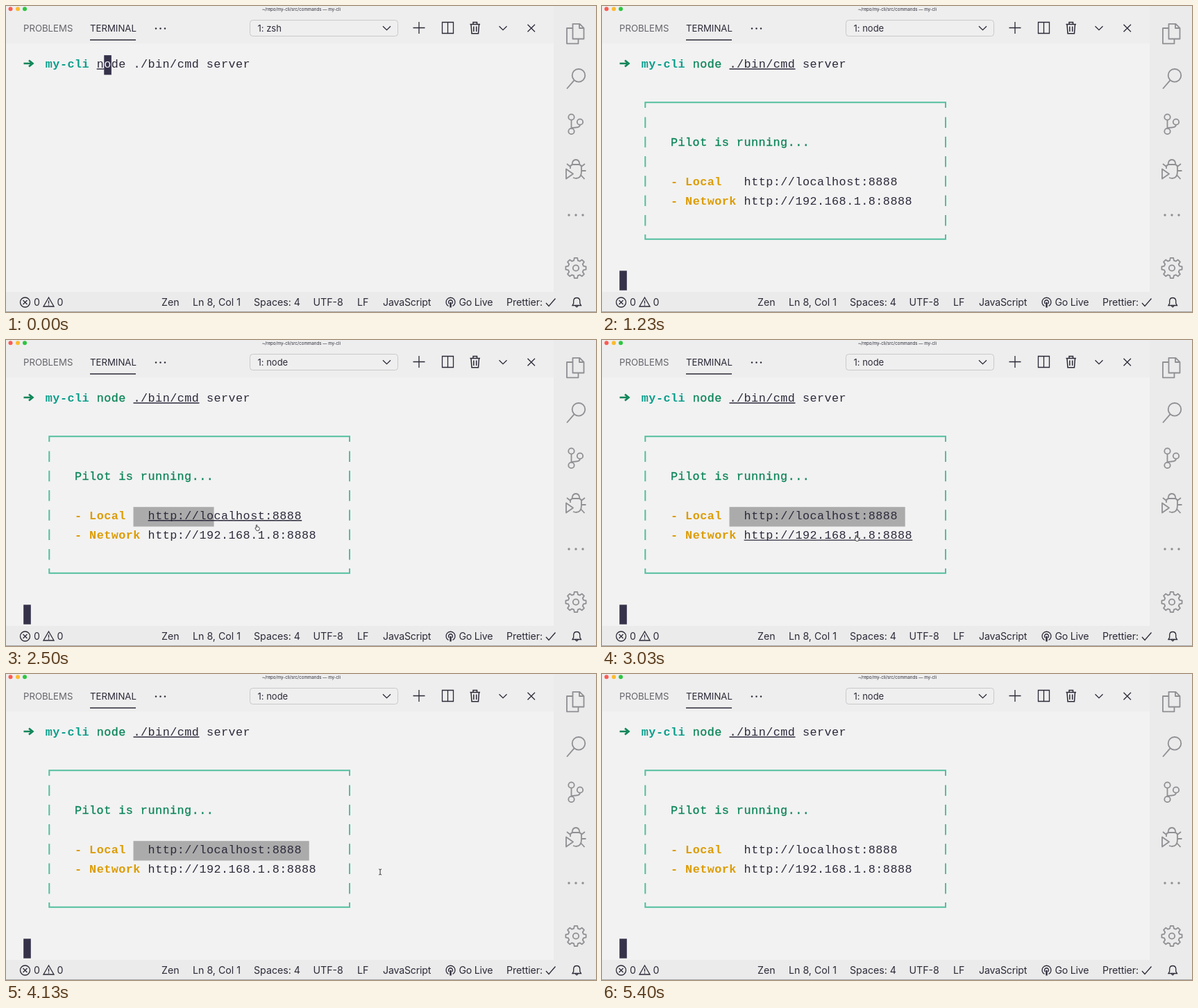
Recreate the animation shown at these times as an HTML page. Size 850 px wide and 442 px high, loop 5430 ms.

```html
<!DOCTYPE html>
<html lang="en">
<head>
<meta charset="utf-8">
<title>Terminal</title>
<style>
  html, body { margin: 0; width: 100%; height: 100%; overflow: hidden; background: #f2f2f2; }
  svg { display: block; width: 850px; height: 442px; }
  .ui { font: 14.2px Inter, Roboto, sans-serif; fill: #2b2a38; }
  .tab { font-size: 13.2px; }
  .pick { font-size: 13px; }
  .mono { font: 16.8px "Liberation Mono", "DejaVu Sans Mono", monospace; letter-spacing: .47px; fill: #2c2a3b; }
  .b { font-weight: 700; }
  .teal { fill: #0c9f8c; }
  .green { fill: #0b8558; stroke: #0b8558; stroke-width: .3; }
  .gold { fill: #dc9c05; }
  .line { fill: none; stroke: #2b2a38; stroke-width: 1.3; }
  .side { fill: none; stroke: #8f8f94; stroke-width: 1.8; }
  .under { stroke: #2c2a3b; stroke-width: 1.4; }
  .frame { fill: none; stroke: #52bf9f; stroke-width: 2; }
</style>
</head>
<body>
<svg viewBox="0 0 850 442">
  <rect width="850" height="442" fill="#ebebeb"/>
  <rect width="789" height="54" fill="#eeeeee"/>
  <rect y="54" width="789" height="359" fill="#f2f2f2"/>
  <rect y="441" width="850" height="1" fill="#a5a5a5"/>

  <!-- title bar -->
  <circle cx="6.5" cy="4.2" r="3" fill="#fc5b53"/>
  <circle cx="17" cy="4.2" r="3" fill="#fcbb2f"/>
  <circle cx="27" cy="4.2" r="3" fill="#2bc63f"/>
  <text class="ui" x="425.5" y="6.8" text-anchor="middle" style="font-size:6.2px">~/repo/my-cli/src/commands — my-cli</text>

  <!-- panel header -->
  <text class="ui tab" x="25" y="37" style="fill:#66656c">PROBLEMS</text>
  <text class="ui tab" x="121" y="37">TERMINAL</text>
  <path class="line" d="M121 49H187"/>
  <g fill="#2b2a38">
    <circle cx="216" cy="32.5" r="1.2"/><circle cx="222.5" cy="32.5" r="1.2"/><circle cx="229" cy="32.5" r="1.2"/>
  </g>
  <rect x="351.5" y="20.5" width="213" height="23" rx="4" fill="#efefef" stroke="#c9c9cc"/>
  <text id="shell" class="ui pick" x="362.5" y="37">1: zsh</text>
  <g class="line">
    <path d="M543 29.2l5.5 5.5 5.5-5.5"/>
    <path d="M586.5 31.5H603.5M595 23V40"/>
    <path d="M628.5 23.5H644.5V39.5H628.5ZM636.5 23.5V39.5"/>
    <path stroke-width="1.5" d="M668.5 26.5H683M673 26.5V23.5H678.5V26.5M670 26.5L671 39.7H680.5L681.500 26.5M673.8 29.5V37M677.7 29.5V37"/>
    <path d="M710.5 29.2l5.5 5.5 5.5-5.5"/>
    <path d="M751.5 26.7L762 37.2M762 26.7L751.5 37.2"/>
  </g>

  <!-- activity bar -->
  <g class="side" stroke-linejoin="round">
    <path d="M816.5 25.8H826.5L832.5 31.8V47.5H816.5ZM826 25.8V32H832.5M816.5 32H808V54.3H824.5V47.5"/>
    <circle cx="825" cy="100.3" r="9.3"/><path d="M818.5 107.3L808 119.5"/>
    <circle cx="814.5" cy="160.5" r="4.2"/><circle cx="827" cy="167.500" r="4.2"/><circle cx="814.5" cy="181" r="4.2"/>
    <path d="M814.5 164.7V176.8M827 171.7Q826.5 175.500 821 175.5T814.5 177"/>
    <path d="M813 235V232Q814 229 817 229H825Q828 229 829 232V239Q829 249 821 249L817 248M815.5 229Q816 222 821 222T826.5 229M829 238H835.5M829 232L834 228M813 232L808 228M828 244L833.5 250M807 235.5V249.5L817 242.5Z"/>
    <path id="gear"/><circle cx="821" cy="378.5" r="4.2"/>
  </g>
  <g fill="#8f8f94">
    <circle cx="811" cy="302" r="1.7"/><circle cx="821" cy="302" r="1.7"/><circle cx="831" cy="302" r="1.7"/>
  </g>

  <!-- status bar -->
  <g class="line">
    <circle cx="27.5" cy="428" r="7"/><path d="M24.5 425L30.5 431M30.5 425L24.5 431"/>
    <path d="M61.5 421L69 434H54ZM61.5 425.5V430M61.5 431V432.5"/>
    <path d="M637.5 433.5A6.5 6.5 0 1 1 643.5 433.5M638.5 430A3 3 0 1 1 642.5 430"/>
    <path d="M640.5 428V435.5" stroke-width="2.4"/>
    <path d="M778 429L782 433.5L791.5 422.5"/>
    <path d="M816 432.5H828.5L826.8 429.5V426Q826.5 421.5 822.2 421.5T817.7 426V429.5ZM820.5 433Q822.2 436.5 824 433"/>
  </g>
  <g class="ui">
    <text x="40" y="433">0</text><text x="73.5" y="433">0</text>
    <text x="224" y="433">Zen</text>
    <text x="269" y="433">Ln 8, Col 1</text>
    <text x="357" y="433">Spaces: 4</text>
    <text x="442.5" y="433">UTF-8</text>
    <text x="506" y="433">LF</text>
    <text x="543" y="433" letter-spacing="-.2">JavaScript</text>
    <text x="652.5" y="433" letter-spacing="-.25">Go Live</text>
    <text x="721" y="433" letter-spacing="-.1">Prettier:</text>
  </g>

  <!-- terminal -->
  <rect id="select" x="183.5" y="241.2" height="28.3" fill="#ababab"/>
  <rect id="caret" width="10.6" height="28.3" fill="#35324a"/>
  <path d="M25.5 83H36M33 78.5L38.5 83L33 87.5" fill="none" stroke="#0b8558" stroke-width="2.6"/>
  <g class="mono">
    <text x="56.8" y="89" class="teal b">my-cli</text>
    <g id="draft">
      <text x="130.7" y="89">n</text>
      <text x="141.25" y="89" style="fill:#f2f2f2">o</text>
      <text x="151.8" y="89">de ./bin/cmd server</text>
      <path class="under" d="M130.7 91H141.2"/>
    </g>
    <g id="command">
      <text x="130.7" y="89" class="green">node</text>
      <text x="183.5" y="89">./bin/cmd server</text>
      <path class="under" d="M183.5 91H278.5"/>
    </g>
    <g id="output">
      <path class="frame" d="M62.3 147V139.200H495V147M62.3 330V336.800H495V330"/>
      <path class="frame" stroke-dasharray="15.5 12.8" d="M62.3 160.4V318M495 160.4V318"/>
      <text x="99" y="202.2" class="green">Pilot is running...</text>
      <g class="gold b">
        <text x="99" y="258.8">-</text><text x="120.1" y="258.8">Local</text>
        <text x="99" y="287.1">-</text><text x="120.1" y="287.1">Network</text>
      </g>
      <text x="204.6" y="258.8">http://localhost:8888</text>
      <text x="204.6" y="287.1">http://192.168.1.8:8888</text>
      <path id="local" class="under" d="M204.6 260.8H426.2"/>
      <path id="network" class="under" d="M204.6 289.1H447.3"/>
    </g>
  </g>

  <g id="tip">
    <rect x="205.5" y="234.5" width="184" height="34" fill="#eeeeee" stroke="#c4c4c4"/>
    <text class="ui" x="216.5" y="256" style="font-size:13.5px"><tspan fill="#1a9be0">Follow Link</tspan> (Cmd + click)</text>
  </g>
  <g id="mouse">
    <path id="beam" d="M-2 -4Q0 -4 0 -3Q0 -4 2 -4M0 -3V3M-2 4Q0 4 0 3Q0 4 2 4" fill="none" stroke="#333" stroke-width="1"/>
    <path id="hand" d="M-1.5 .5V-3.5Q-.7 -4.7 0 -3.5V-1Q3 -1.2 3.3 .5V2L2.3 4.3H-1L-3 1Q-2.6 -.4 -1.5 .5Z" fill="#fff" stroke="#333" stroke-width=".9"/>
  </g>
</svg>
<script>
  const LOOP = 5430, CELL = 10.55, LEFT = 25.2, TOP = 71.1, ROW = 28.3;
  const $ = id => document.getElementById(id);
  const show = (id, on) => $(id).setAttribute('visibility', on ? 'inherit' : 'hidden');
  const within = (t, a, b) => t >= a && t < b;

  // Start time, column, row of the block caret
  const caret = [[0, 11, 0], [30, 31, 0], [670, 0, 1], [970, 0, 11]];

  // Time, x, y of the mouse
  const path = [
    [1700, 300, 318], [2070, 192, 262], [2320, 184, 258], [2410, 240, 264],
    [2500, 361, 271], [2580, 432, 269], [2720, 434, 272], [3030, 367, 286],
    [3300, 345, 290], [3600, 228, 301], [3770, 208, 303], [3880, 216, 302],
    [4000, 410, 295], [4130, 539, 286], [4330, 557, 276], [4500, 562, 266],
    [4700, 600, 140], [4870, 643, -10]
  ];

  // Time and end column of the selection
  const drag = [[2350, 15], [2430, 19], [2500, 26], [2620, 39]];

  function at(keys, t) {
    let i = 0;
    while (i < keys.length - 2 && t >= keys[i + 1][0]) i++;
    const a = keys[i], b = keys[i + 1];
    const p = Math.min(1, Math.max(0, (t - a[0]) / (b[0] - a[0])));
    return a.slice(1).map((v, k) => v + (b[k + 1] - v) * p);
  }

  function gear(cx, cy, teeth) {
    const pts = [];
    for (let i = 0; i < teeth; i++)
      for (const [turn, r] of [[-.33, 11.3], [-.19, 14.8], [.19, 14.8], [.33, 11.3]]) {
        const a = (i + turn) / teeth * 2 * Math.PI;
        pts.push((cx + r * Math.cos(a)).toFixed(1) + ' ' + (cy + r * Math.sin(a)).toFixed(1));
      }
    return 'M' + pts.join('L') + 'Z';
  }

  function draw(t) {
    const [, col, row] = caret.filter(k => k[0] <= t).pop();
    $('caret').setAttribute('x', LEFT + col * CELL);
    $('caret').setAttribute('y', TOP + row * ROW);
    show('draft', t < 30);
    show('command', t >= 30);
    show('output', t >= 970);
    $('shell').textContent = t < 670 ? '1: zsh' : '1: node';

    const selected = within(t, 2350, 4500);
    show('select', selected);
    if (selected) $('select').setAttribute('width', (Math.floor(at(drag, t)[0] + .01) - 15) * CELL);

    const onLocal = within(t, 2360, 2780), onNetwork = within(t, 2860, 3910);
    show('local', onLocal);
    show('network', onNetwork);

    $('tip').setAttribute('opacity', within(t, 3720, 3930) ? Math.min(1, (t - 3720) / 110) : 0);

    const [x, y] = at(path, t);
    show('mouse', within(t, 1700, 4870));
    show('hand', onLocal || onNetwork);
    show('beam', !onLocal && !onNetwork);
    $('mouse').setAttribute('transform', `translate(${x} ${y})`);
  }

  $('gear').setAttribute('d', gear(821, 378.5, 8));
  const start = performance.now();
  function tick() {
    draw((performance.now() - start) % LOOP);
    requestAnimationFrame(tick);
  }
  tick();
</script>
</body>
</html>
```
